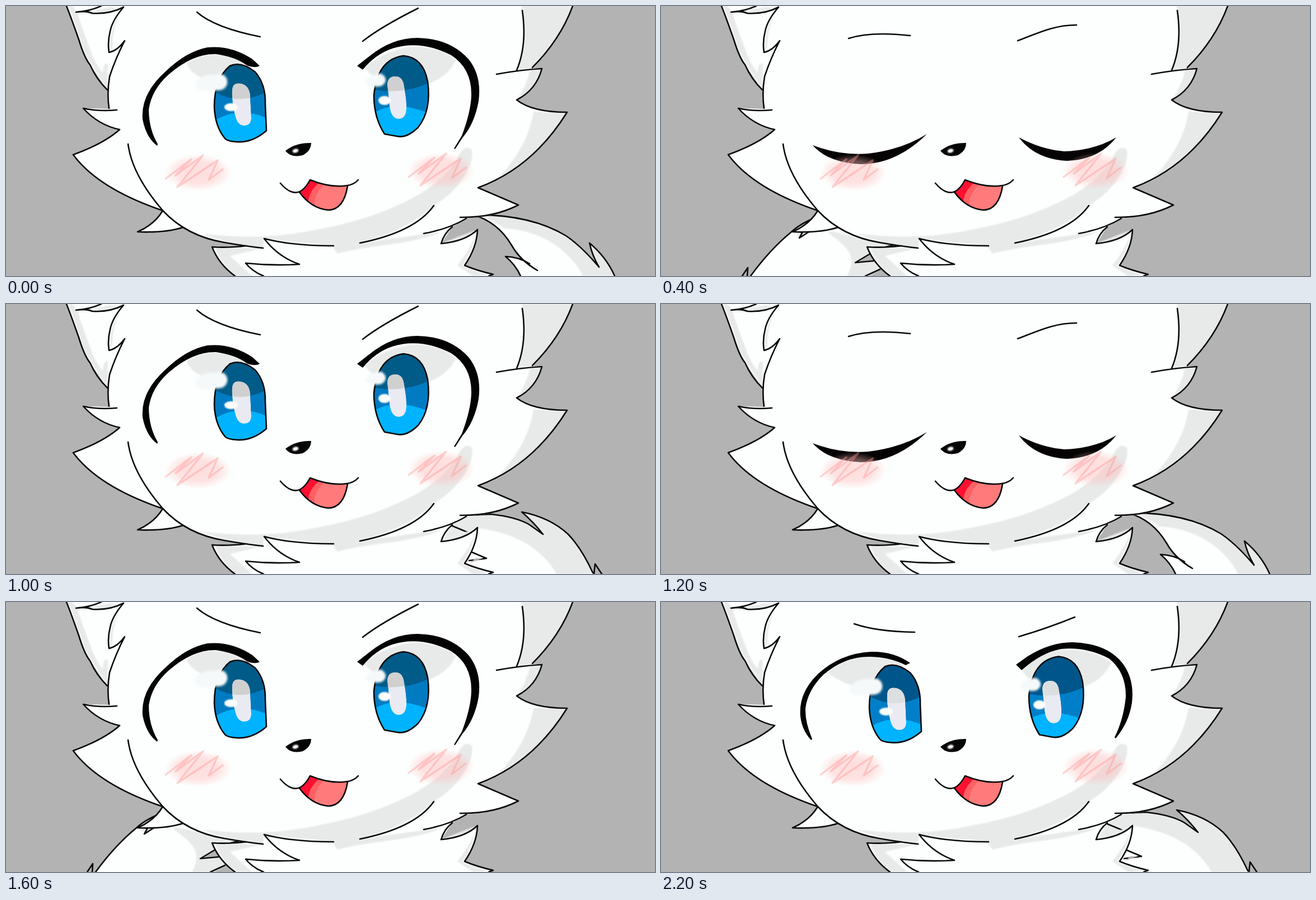
An HTML page for the animation above (2400 ms loop, 1159x483 px).

```html
<!DOCTYPE html>
<html lang="en">
<head>
<meta charset="utf-8">
<title>Blinking cat</title>
<style>
html, body { margin: 0; width: 100%; height: 100%; overflow: hidden; background: #b3b3b3; }
svg { display: block; width: 100%; height: 100%; }
.line { fill: none; stroke: #080808; stroke-width: 2.6; stroke-linecap: round; stroke-linejoin: round; }
.fur { fill: #fdfffe; }
.shade { fill: #e8eae9; }
.soft { filter: url(#soft); }
.haze { filter: url(#haze); }
</style>
</head>
<body>
<svg id="stage" viewBox="0 0 1159 483" preserveAspectRatio="none"></svg>
<script>
const path = (d, attrs = 'class="line"') => `<path d="${d}" ${attrs}/>`;
const fur = d => path(d, 'class="fur"');
const shade = d => path(d, 'class="shade soft"');
const fill = (d, color) => path(d, `fill="${color}"`);
const spot = (x, y, rx, ry, color = '#fff', turn = 0, blur = 'soft') =>
  `<ellipse cx="${x}" cy="${y}" rx="${rx}" ry="${ry}" fill="${color}" class="${blur}" transform="rotate(${turn} ${x} ${y})"/>`;
const group = (id, content) => `<g id="${id}" display="none">${content}</g>`;

// Tail poses, from far right to far left
const tails = {
  farRight:
    fur('M835 374Q935 372 1000 411Q1025 427 1054 460L1059 467Q1050 445 1042 424Q1072 449 1087 483H919Q910 465 892 448Q916 450 935 462L949 472Q920 455 903 428Q875 385 835 374Z') +
    shade('M840 374Q935 374 1000 411Q1025 427 1054 460L1059 467Q1050 445 1042 424Q1072 449 1086 483H1030Q1018 457 990 434Q945 400 890 398Q865 380 840 374Z') +
    path('M835 374Q935 372 1000 411Q1028 430 1059 467Q1047 447 1042 424Q1072 449 1087 483M835 374Q878 386 903 428Q918 455 949 473M919 483Q910 463 892 448Q916 449 935 461'),
  right:
    fur('M777 425L797 395L812 378Q840 378 866 376Q912 381 935 395L959 412Q942 390 921 372Q972 382 1004 412Q1028 437 1050 483H860L819 464Z') +
    shade('M780 424L797 395L822 379Q845 378 866 376Q912 381 935 395L959 412Q942 390 921 372Q972 382 1004 412Q1028 437 1046 483H983Q968 455 935 432Q895 407 843 401Z') +
    path('M812 378Q840 378 866 376Q912 381 935 395L959 412Q942 390 921 372Q972 382 1004 412Q1028 437 1048 481M1050 483L1052 465L1064 483M797 397L826 409M832 444L858 455L827 459') +
    fill('M838 455L851 455L829 463Z', '#b3b3b3'),
  left:
    fur('M278 378L233 404Q195 435 160 483H365L393 470L380 456L347 459L374 443Q390 433 415 428L316 396Z') +
    shade('M300 402L415 428Q390 433 374 443L347 459L380 456L393 470L372 483H332Q345 460 337 443Q330 428 300 407Z') +
    shade('M240 405Q255 408 270 402L248 415Z') +
    path('M278 378Q250 388 233 404Q195 435 160 483M145 483L155 468L154 483M246 402L252 406L247 415L264 404M415 428Q387 433 372 444L347 459L380 456M365 483L391 471'),
  farLeft:
    fur('M240 402Q185 424 147 470Q153 448 164 427Q133 449 120 483H290Q302 467 314 450Q280 461 257 475Q280 443 327 402L285 385Z') +
    shade('M220 412Q195 424 147 470Q153 448 164 430Q135 453 122 483Q145 465 165 459Q190 430 230 414Z') +
    shade('M285 403L323 402Q280 440 257 475L311 451L289 483H272L285 464L238 474Q275 440 300 410Z') +
    path('M240 404Q185 424 147 470Q153 448 164 427Q133 449 120 483M327 402Q283 438 257 475Q282 458 314 450Q300 464 290 483')
};

const body =
  fur('M108 0Q116 17 130 60Q142 100 150 105L181 150L184 184L138 183Q165 212 203 221Q175 246 120 266Q165 327 280 366Q265 391 235 404Q285 406 316 396Q362 423 430 430L368 431Q380 462 408 483H866L870 481Q840 473 819 464Q841 432 842 400Q820 421 777 425L797 395L822 380Q880 377 915 356L843 325Q940 290 1002 190Q940 190 912 168Q947 150 957 112L940 111Q990 60 1012 0Z') +
  // ears
  shade('M111 0Q125 34 139 82L181 150L182 104Q174 98 173 120Q158 102 150 76Q136 40 128 14L168 14L205 5L186 2Q150 10 128 10L118 0Z') +
  shade('M204 11Q184 42 185 82L190 74Q189 45 204 11Z') +
  shade('M922 8Q931 70 912 115L940 111Q990 60 1012 0H921Z') +
  // cheeks and neck
  shade('M936 114L956 113Q945 151 912 168Q929 145 936 114Z') +
  shade('M942 189L1001 191Q940 290 848 324Q876 313 893 292Q934 242 942 189Z') +
  shade('M350 407Q460 421 560 399Q640 384 700 356Q780 322 810 265Q820 247 832 257Q837 284 805 323Q790 341 764 357Q720 400 632 424L778 404Q755 416 690 426Q620 435 592 443L582 429L461 417L459 433Q400 428 350 407Z') +
  shade('M374 433L459 433L430 440L400 447L440 483H410Q383 460 374 433Z') +
  shade('M841 402Q835 435 815 465L861 481L834 483L806 464Q829 436 841 402Z') +
  shade('M777 425Q822 421 842 400Q822 407 777 425Z') +
  path('M108 0Q116 20 130 60Q140 93 150 105Q162 132 181 150M170 0Q150 9 125 11Q143 8 154 13Q185 15 210 2Q190 25 186 45Q181 65 184 83Q199 80 212 62Q196 93 185 126Q180 155 184 183') +
  path('M198 186Q165 189 138 183Q165 213 203 221Q175 246 120 266Q165 327 280 366Q265 391 235 404Q285 406 316 396') +
  path('M218 247Q225 302 280 366Q323 412 390 423Q430 430 459 433M430 429Q395 433 368 431Q380 462 409 483M585 429Q510 429 461 416Q486 449 524 462Q475 465 428 460Q440 475 460 483') +
  path('M632 424Q731 404 764 357M746 407Q791 399 822 380M811 378Q870 379 915 356L843 325Q940 290 1002 190Q940 190 912 168Q947 150 957 112Q920 114 876 122M922 8Q931 70 912 115M1012 0Q990 60 940 110') +
  path('M797 395Q782 407 777 425Q820 421 842 400Q841 432 819 464Q840 473 870 480L862 483');

const scribble = 'M285 309L331 274L303 303L352 267L306 324L378 276L362 311L387 292';
const blush = `<g id="blush">
  <ellipse cx="343" cy="298" rx="60" ry="33" fill="url(#pink)"/>
  <path d="${scribble}" fill="none" stroke="#ff9696" stroke-opacity=".42" stroke-width="3.4" stroke-linecap="round" stroke-linejoin="round"/>
</g><use href="#blush" x="434" y="-3"/>`;

const muzzle =
  fill('M499 259Q518 244 545 245Q545 259 530 267Q509 272 499 259Z', '#050505') +
  spot(517, 259, 5.5, 3.6, '#fff', -15) +
  fill('M543 311Q580 325 610 322Q603 365 575 365Q545 362 524 333Q538 327 543 311Z', '#ff7b7b') +
  fill('M543 311L568 319Q549 338 551 357Q535 347 524 333Q538 327 543 311Z', '#ff6063') +
  fill('M543 311L558 317Q541 333 540 349Q530 341 524 333Q538 327 543 311Z', '#ff1030') +
  path('M524 333Q545 362 575 365Q603 365 610 322M490 317Q521 353 543 311Q580 326 610 321Q622 319 629 311');

const irises = {
  L: 'M372 180Q372 130 400 107Q420 98 445 118Q464 140 463 175L465 223Q440 245 412 243Q395 242 391 237Q373 215 372 180Z',
  R: 'M710 89Q745 92 753 135Q760 187 736 217Q716 237 698 233L676 229Q657 200 657 160Q663 95 710 89Z'
};
const pupils = {
  L: 'M404 150Q405 136 420 139Q434 142 436 160L438 200Q438 214 425 214Q413 214 409 195Q403 175 404 150Z',
  R: 'M681 140Q682 125 696 126Q709 126 711 145Q716 170 715 185Q714 201 702 202Q688 202 685 180Z'
};
const darkBands = {
  L: 'M360 90V145Q414 186 475 148V90Z',
  R: 'M645 70V147Q710 163 766 132V70Z'
};
const brightBands = {
  L: 'M360 214Q412 172 475 205V260H360Z',
  R: 'M645 200Q690 160 766 197V250H645Z'
};

// drop moves the iris, dip its inner parts, sink the bright band further
function iris(side, id, { drop, dip, sink = 0, colors: [top, mid, gray] }) {
  const shift = y => `transform="translate(0 ${y})"`;
  const iris = irises[side];
  return `<clipPath id="${id}i"><path d="${iris}" ${shift(drop)}/></clipPath>
    <clipPath id="${id}p"><path d="${pupils[side]}" ${shift(dip)}/></clipPath>
    <g clip-path="url(#${id}i)">
      <path d="${iris}" fill="${mid}" ${shift(drop)}/>
      <path d="${darkBands[side]}" fill="${top}" ${shift(dip)}/>
      <path d="${brightBands[side]}" fill="#00b3ff" ${shift(dip + sink)}/>
    </g>
    <g clip-path="url(#${id}p)">
      <path d="${pupils[side]}" fill="#eaeaf2" ${shift(dip)}/>
      <path d="${darkBands[side]}" fill="${gray}" ${shift(dip)}/>
    </g>` + path(iris, `class="line" ${shift(drop)}`);
}

function openEyes(id, look) {
  const glare = '#f5f9fa';
  return group(id,
    shade(look.lids) +
    iris('L', id + 'L', look) + iris('R', id + 'R', look) +
    `<g transform="translate(0 ${look.dip})">` +
    spot(365, 138, 28, 15, glare, -8, 'haze') + spot(382, 136, 13, 14, glare, 0, 'haze') +
    spot(402, 181, 12, 7) +
    spot(659, 134, 18, 10, glare, -8, 'haze') + spot(667, 132, 10, 11, glare, 0, 'haze') +
    spot(676, 169, 11, 8) + '</g>' +
    fill(look.lashes, '#030303') + path(look.brows));
}

const wide = {
  drop: 0, dip: 0,
  colors: ['#005b88', '#007bc2', '#d0d0d1'],
  lids: 'M322 102Q350 85 380 87Q415 92 438 106L400 135L375 150L345 126Q328 118 322 102ZM638 110Q685 74 735 72Q790 78 803 98Q788 128 752 140L690 120L656 126Z',
  lashes: 'M453 107L440 95Q402 70 360 74Q322 81 284 118Q240 158 244 203Q250 235 270 250L271 247Q255 220 255 185Q260 150 290 123Q333 85 375 86Q410 91 430 106Q445 112 453 107Z' +
    'M627 107L650 89Q690 57 735 57Q793 58 826 95Q850 125 844 170Q837 210 815 236L802 256L800 255L814 232Q830 190 831 160Q832 112 795 88Q740 60 690 76Q660 86 637 114Z',
  brows: 'M341 11Q373 39 454 55M637 63Q670 37 736 4'
};
const half = {
  drop: 8.5, dip: 15, sink: 4,
  colors: ['#00568a', '#007fc8', '#dbdfe0'],
  lids: 'M298 125Q335 96 375 97Q415 99 436 112L400 135L350 152Q310 140 298 125ZM643 121Q680 88 715 85Q770 83 804 108Q790 140 754 152L690 125L657 138Z',
  lashes: 'M445 109Q415 88 375 89Q320 92 280 129Q245 163 249 205Q252 230 268 247L270 245Q257 215 258 190Q262 158 290 130Q330 96 375 98Q410 99 437 113Z' +
    'M634 112L655 97Q695 72 735 72Q795 74 823 108Q846 137 841 180Q836 215 812 244L810 242Q826 210 830 170Q831 126 800 101Q760 80 715 84Q680 90 644 122Z',
  brows: 'M345 39Q385 53 453 54M639 62Q690 47 739 27'
};

const eyes =
  openEyes('wide', wide) +
  openEyes('glint', { ...wide, sink: 4 }) +
  openEyes('half', half) +
  group('shut',
    fill('M271 249Q320 268 370 264Q430 257 475 229Q420 283 357 283Q297 280 271 249ZM639 235Q680 257 720 260Q775 258 813 235Q782 275 725 277Q668 274 639 235Z', '#050303') +
    path('M335 58Q375 45 445 53M637 62C670 50 700 34 742 34'));

const blur = (id, size) =>
  `<filter id="${id}" x="-30%" y="-30%" width="160%" height="160%"><feGaussianBlur stdDeviation="${size}"/></filter>`;

const stage = document.getElementById('stage');
stage.innerHTML = `<defs>${blur('soft', 1.2)}${blur('haze', 2.2)}
  <radialGradient id="pink">
    <stop offset="0" stop-color="#ffbcbc" stop-opacity=".5"/>
    <stop offset=".6" stop-color="#ffbcbc" stop-opacity=".42"/>
    <stop offset="1" stop-color="#ffbcbc" stop-opacity="0"/>
  </radialGradient></defs>` +
  Object.entries(tails).map(([id, art]) => group(id, art)).join('') +
  body + eyes + muzzle + blush;

const STEP = 200;
const eyeSteps = 'wide glint shut half glint wide shut half wide wide shut half'.split(' ');
const tailSteps = 'farRight right left farLeft left right farRight right left farLeft left right'.split(' ');
const poses = [...stage.querySelectorAll('g[display]')];
const start = performance.now();

function draw(now) {
  const step = Math.floor(Math.max(0, now - start) / STEP) % eyeSteps.length;
  for (const pose of poses) {
    const shown = pose.id === eyeSteps[step] || pose.id === tailSteps[step];
    pose.setAttribute('display', shown ? 'inline' : 'none');
  }
  requestAnimationFrame(draw);
}
draw(start);
</script>
</body>
</html>
```
